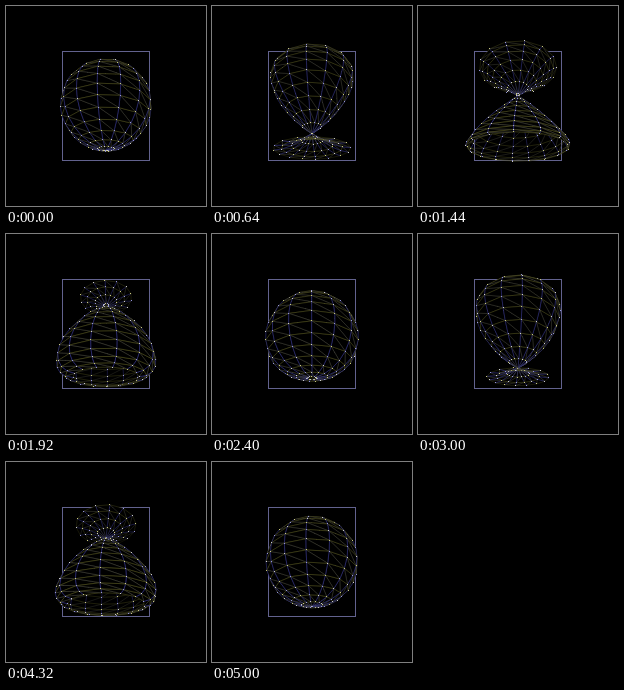
Recreate the animation shown at these times as an HTML page with a canvas. Size 200 by 200 pixels, loop 5040 ms.

```html
<!DOCTYPE html>
<html>
<head>
<meta charset="utf-8">
<style>
html, body { margin: 0; width: 100%; height: 100%; overflow: hidden; background: #000; }
canvas { display: block; width: 200px; height: 200px; }
</style>
</head>
<body>
<canvas id="stage" width="200" height="200"></canvas>
<script>
const ctx = document.getElementById('stage').getContext('2d');
const TAU = Math.PI * 2;
const STEPS = 126, STEP_MS = 40;
const N = 15;                 // segments around and from end to end
const FOCAL = 178, DISTANCE = 4;
const TILT_SIN = Math.sin(Math.PI / 6), TILT_COS = Math.cos(Math.PI / 6);
const ROW = '#565622', COLUMN = '#3e3e98', DIAGONAL = '#46463a';
const DOTS = ['#c8c87c', '#9494d8', '#cccccc'];

function project(radius, angle, height) {
  const x = radius * Math.sin(angle), z = radius * Math.cos(angle);
  const depth = z * TILT_COS - height * TILT_SIN;
  const scale = FOCAL / (DISTANCE - depth);
  return { x: 100 + x * scale, y: 100 - (height * TILT_COS + z * TILT_SIN) * scale, depth };
}

// A sphere profile whose radius runs out of phase with its height.
function buildMesh(phase) {
  return Array.from({ length: N + 1 }, (_, i) => {
    const lat = Math.PI * i / N;
    return Array.from({ length: N }, (_, j) => ({
      ...project(Math.sin(lat + phase), TAU * (j / N - 1 / 60) - phase, Math.cos(lat)),
      color: DOTS[(i + j) % 3]
    }));
  });
}

function makeFace(points, colors) {
  const [a, b, c] = points;
  const front = (b.x - a.x) * (c.y - a.y) - (b.y - a.y) * (c.x - a.x) > 0;
  return { points, colors, front, depth: (a.depth + b.depth + c.depth) / 3 };
}

function buildFaces(mesh) {
  const faces = [];
  for (let i = 0; i < N; i++) {
    for (let j = 0; j < N; j++) {
      const k = (j + 1) % N;
      const a = mesh[i][j], b = mesh[i][k], c = mesh[i + 1][k], d = mesh[i + 1][j];
      faces.push(makeFace([a, b, c], [ROW, COLUMN, DIAGONAL]),
                 makeFace([a, c, d], [DIAGONAL, ROW, COLUMN]));
    }
  }
  return faces.sort((p, q) => p.depth - q.depth);
}

function drawFace({ points, colors, front, depth }) {
  if (front) {
    ctx.fillStyle = '#000';
    ctx.beginPath();
    points.forEach(p => ctx.lineTo(p.x, p.y));
    ctx.fill();
  }
  ctx.globalAlpha = (0.6 + 0.28 * depth) * (front ? 1 : 0.7);
  points.forEach((p, n) => {
    const q = points[(n + 1) % 3];
    ctx.strokeStyle = colors[n];
    ctx.beginPath();
    ctx.moveTo(p.x, p.y);
    ctx.lineTo(q.x, q.y);
    ctx.stroke();
  });
  ctx.globalAlpha = 1;
  points.forEach(p => {
    ctx.fillStyle = p.color;
    ctx.fillRect(Math.floor(p.x), Math.floor(p.y), 1, 1);
  });
}

function draw(step) {
  ctx.fillStyle = '#000';
  ctx.fillRect(0, 0, 200, 200);
  ctx.lineWidth = 1;
  ctx.strokeStyle = '#62628e';
  ctx.strokeRect(56.5, 45.5, 87, 109);
  ctx.lineWidth = 0.6;
  buildFaces(buildMesh(TAU * (step + 1) / STEPS)).forEach(drawFace);
}

function tick() {
  draw(Math.floor(performance.now() / STEP_MS) % STEPS);
  requestAnimationFrame(tick);
}
tick();
</script>
</body>
</html>
```
